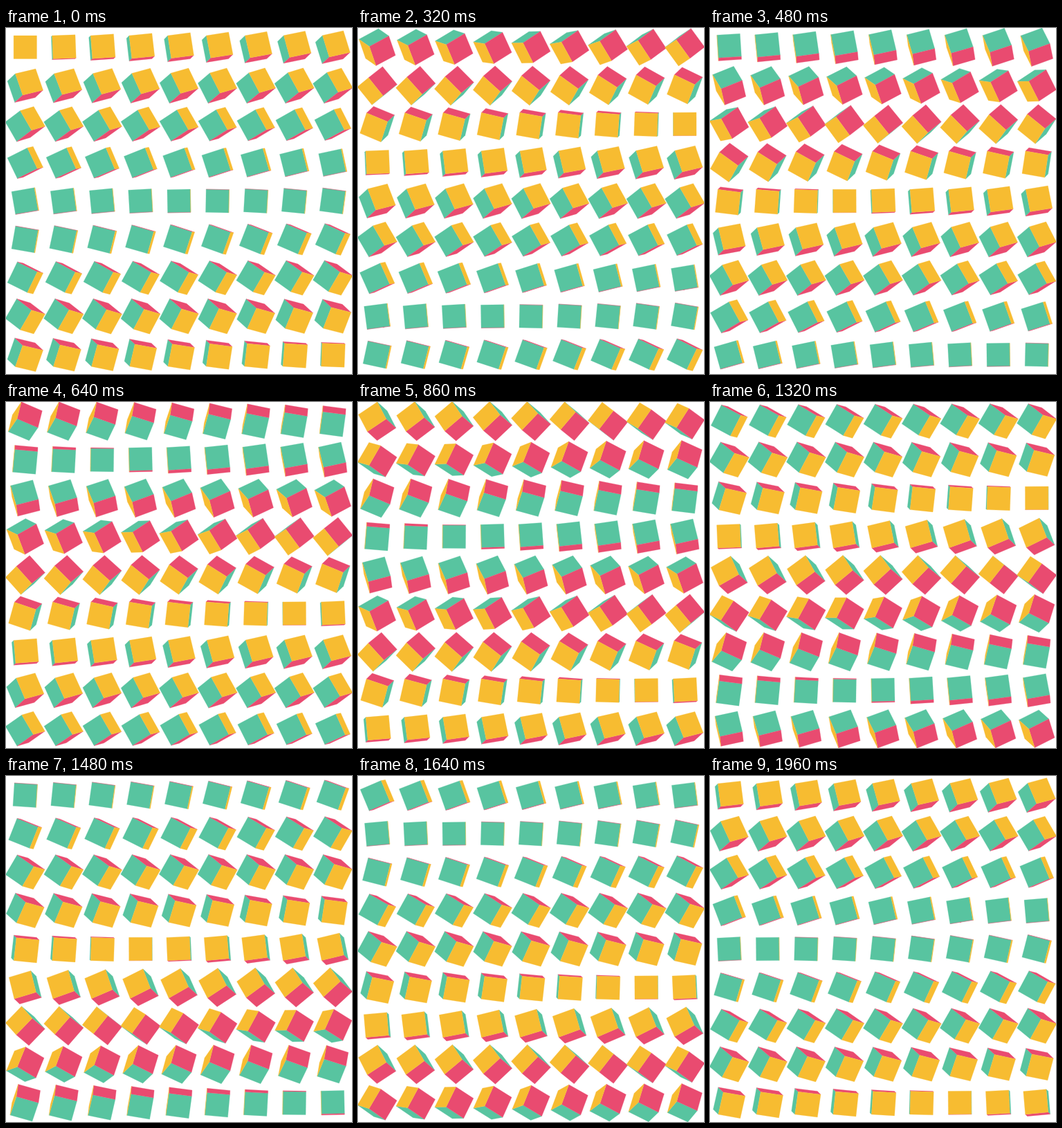
An HTML page with a canvas that plays this animation: 500x500 px, repeating every 1.98 s.

```html
<!DOCTYPE html>
<html lang="en">
<head>
<meta charset="utf-8">
<title>Turning cubes</title>
<style>
html, body { margin: 0; height: 100%; overflow: hidden; background: #fff; }
canvas { display: block; }
</style>
</head>
<body>
<canvas id="stage" width="500" height="500"></canvas>
<script>
const ctx = document.getElementById('stage').getContext('2d');
const GRID = 9, CELL = 500 / GRID, HALF = CELL * 0.3;
const TURN = 2000, LOOP = 1980, STEP = 20;
const COLORS = ['#58c4a0', '#e94b70', '#f7bc31']; // faces across x, y, z
const CORNERS = [[-1, -1], [1, -1], [1, 1], [-1, 1]];

// Columns of Rx(a)·Ry(a)·Rz(a): the cube's axes in screen space, z pointing away
function axes(a) {
  const s = Math.sin(a), c = Math.cos(a);
  return [
    [c * c, s * s * c + s * c, s * s - s * c * c],
    [-s * c, c * c - s ** 3, s * c + s * s * c],
    [s, -s * c, c * c]
  ];
}

function drawCube(cx, cy, angle) {
  const basis = axes(angle);
  basis.forEach((n, i) => {
    if (Math.abs(n[2]) < 1e-6) return;
    const side = n[2] > 0 ? -1 : 1; // the face turned to the viewer
    const u = basis[(i + 1) % 3], v = basis[(i + 2) % 3];
    const at = (k, p, q) => HALF * (side * n[k] + p * u[k] + q * v[k]);
    ctx.beginPath();
    for (const [p, q] of CORNERS) ctx.lineTo(cx + at(0, p, q), cy + at(1, p, q));
    ctx.closePath();
    ctx.fillStyle = ctx.strokeStyle = COLORS[i];
    ctx.fill();
    ctx.stroke(); // hides the seams between faces
  });
}

function draw() {
  const t = Math.floor(((performance.now() + 0.5) % LOOP) / STEP) * STEP;
  ctx.clearRect(0, 0, 500, 500);
  ctx.lineWidth = 0.3;
  ctx.lineJoin = 'round';
  for (let n = 0; n < GRID * GRID; n++) {
    const turn = t / TURN - n / (2 * GRID * GRID);
    drawCube((n % GRID + 0.5) * CELL, (Math.floor(n / GRID) + 0.5) * CELL, turn * 2 * Math.PI);
  }
  requestAnimationFrame(draw);
}
draw();
</script>
</body>
</html>
```
